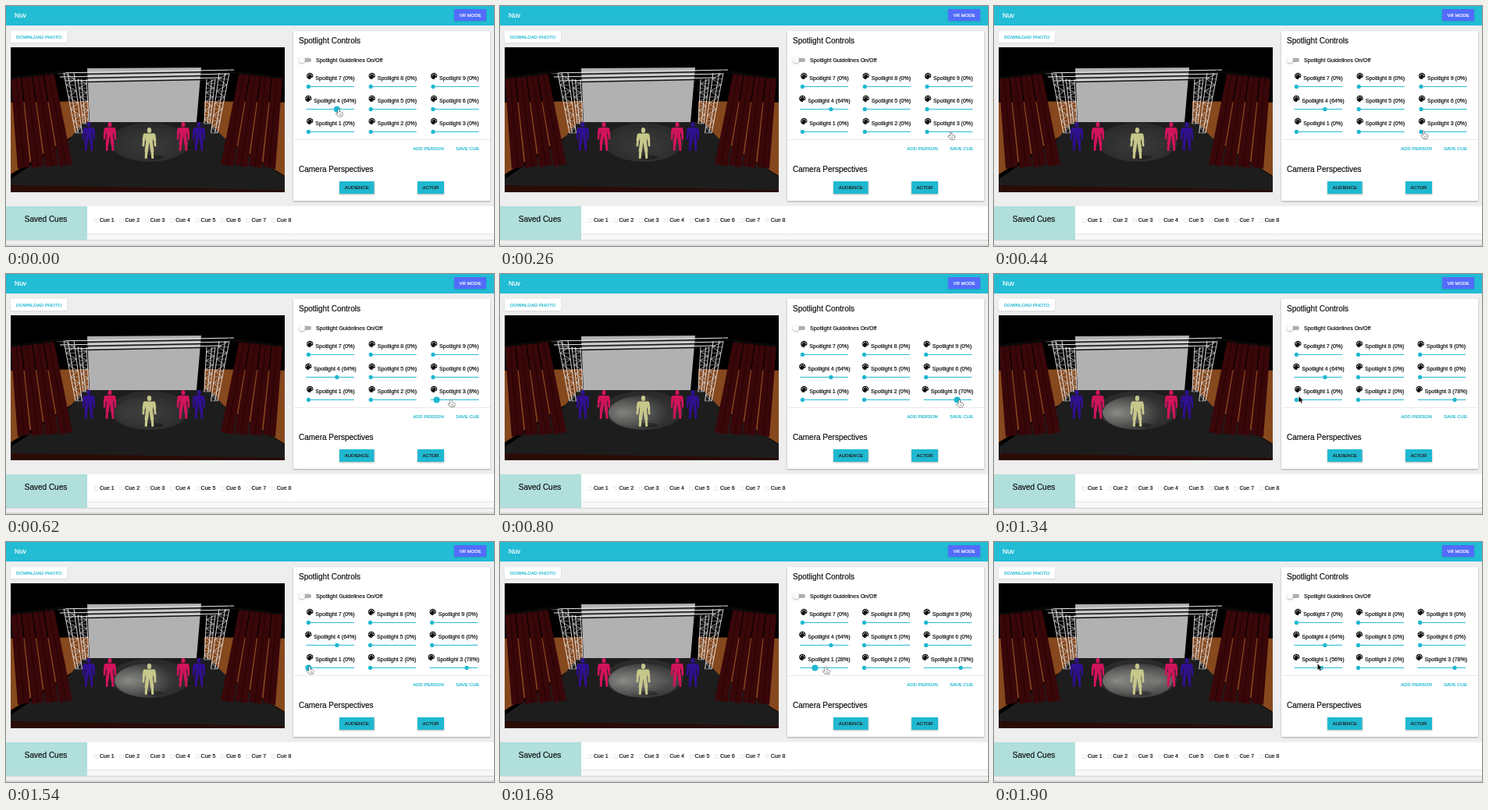
These frames come from a looping animation (625 px wide and 308 px high, 1920 ms). An HTML page with a canvas:

```html
<!DOCTYPE html>
<html lang="en">
<head>
<meta charset="utf-8">
<title>Stage lighting</title>
<style>
html, body { margin: 0; width: 100%; height: 100%; overflow: hidden; background: #eee; }
canvas { display: block; width: 625px; height: 308px; }
</style>
</head>
<body>
<canvas id="stage" width="625" height="308"></canvas>
<script>
const c = document.getElementById('stage').getContext('2d');
const LOOP = 1920, CYAN = '#1fb8d0', TAU = Math.PI * 2;
const FONT = '"Liberation Sans", Arial, sans-serif';

const mix = (a, b, k) => a + (b - a) * k;

// Decelerating progress from 0 to 1 between two times.
function ease(t, from, to) {
  const p = Math.min(1, Math.max(0, (t - from) / (to - from)));
  return 1 - (1 - p) ** 2;
}

function rect(x, y, w, h, fill) {
  c.fillStyle = fill;
  c.fillRect(x, y, w, h);
}

function poly(points, fill) {
  c.beginPath();
  for (let i = 0; i < points.length; i += 2) c.lineTo(points[i], points[i + 1]);
  c.closePath();
  c.fillStyle = fill;
  c.fill();
}

function line(x1, y1, x2, y2, color, width = 1) {
  c.beginPath();
  c.moveTo(x1, y1);
  c.lineTo(x2, y2);
  c.strokeStyle = color;
  c.lineWidth = width;
  c.stroke();
}

function oval(x, y, rx, ry, fill) {
  c.beginPath();
  c.ellipse(x, y, rx, ry, 0, 0, TAU);
  c.fillStyle = fill;
  c.fill();
}

// A hairline outline gives the type its slightly heavier weight.
function text(s, x, y, size, fill = '#111', align = 'left') {
  c.font = `${size}px ${FONT}`;
  c.textAlign = align;
  c.fillStyle = c.strokeStyle = fill;
  c.lineWidth = .2;
  c.fillText(s, x, y);
  c.strokeText(s, x, y);
}

function shadowed(draw, alpha = .3) {
  c.save();
  c.shadowColor = `rgba(0,0,0,${alpha})`;
  c.shadowBlur = 2;
  c.shadowOffsetY = 1;
  draw();
  c.restore();
}

function button(label, x, y, w, h, fill, color, shade) {
  shadowed(() => rect(x, y, w, h, fill), shade);
  text(label, x + w / 2, y + h / 2 + 2.2, 6, color, 'center');
}

// Pool of light on the floor, brightest toward one side.
function pool(side, power) {
  c.save();
  c.translate(184, 178);
  c.scale(45, 22);
  const g = c.createRadialGradient(side * .6, 0, 0, side * .6, 0, 1.3);
  g.addColorStop(0, `rgba(200,200,195,${power})`);
  g.addColorStop(.5, `rgba(180,180,175,${power * .55})`);
  g.addColorStop(1, 'rgba(160,160,160,0)');
  oval(0, 0, 1, 1, g);
  c.restore();
}

function person(x, top, height, fill) {
  c.save();
  c.translate(x, top);
  c.scale(height / 40, height / 40);
  c.lineCap = 'round';
  oval(0, 3.5, 2.7, 3.5, fill);
  poly([-6, 7.5, 6, 7.5, 4, 20, -4, 20], fill);
  for (const side of [-1, 1]) {
    line(side * 6, 9.5, side * 7, 16, fill, 3.8);
    line(side * 7, 16, side * 7.6, 23, fill, 2.8);
    line(side * 2.4, 20, side * 3.7, 30, fill, 4.4);
    line(side * 3.7, 30, side * 4.2, 38.5, fill, 3.2);
  }
  c.restore();
}

// Lattice tower that narrows and leans on its way down.
function tower(x, top, bottom, lean, width) {
  const at = (k, side) => [x + lean * k + side * width * (1 - k * .35), mix(top, bottom, k)];
  for (const side of [0, .4, 1]) line(...at(0, side), ...at(1, side), '#eee', .9);
  for (let i = 0; i < 10; i++) {
    const a = i / 10, b = a + .1, flip = i % 2;
    line(...at(a, flip), ...at(b, 1 - flip), '#ddd', .7);
    line(...at(b, 0), ...at(b, 1), '#bbb', .6);
  }
}

function mirrored(draw) {
  draw();
  c.save();
  c.translate(360, 0);
  c.scale(-1, 1);
  draw();
  c.restore();
}

function curtains() {
  for (let i = 0; i < 4; i++) {
    const top = 6 + i * 14, bottom = 15 + i * 18;
    poly([top, 92 - i * 2, top + 13, 90 - i * 2, bottom + 16, 206 - i, bottom, 209 - i], '#390709');
    line(top + 7, 92 - i * 2, bottom + 8, 207 - i, '#220304', 1);
  }
  line(-10, 94, 76, 84, '#080808', 3);
}

function scene(s1, s3) {
  c.save();
  c.beginPath();
  c.rect(6, 53, 351, 186);
  c.clip();
  rect(6, 53, 351, 186, '#000');
  mirrored(() => poly([-10, 124, 106, 122, 106, 150, 88, 165, -10, 226], '#86481d'));
  poly([100, 149, 260, 149, 284, 174, 357, 219, 357, 239, 6, 239, 6, 222, 80, 172], '#1d1d1d');
  poly([6, 230, 357, 236, 357, 239, 6, 239], '#2a0b06');

  poly([104, 80, 250, 79, 244, 149, 107, 149], '#b1b1b1');
  oval(184, 175, 51, 25, '#2b2b2b');
  pool(0, .1);
  pool(-1, s3 * .75);
  pool(1, s1 * .8);
  oval(190, 194, 12, 3, 'rgba(0,0,0,.3)');

  // Battens hung across the stage.
  for (let i = 0; i < 3; i++) {
    const y = 82 + i * 5;
    line(62 + i * 7, y + 4, 292 - i * 8, y, '#eee', 1);
    line(66 + i * 7, y + 6, 288 - i * 8, y + 2, '#161616', 1.4);
  }

  mirrored(() => {
    tower(74, 86, 163, 15, 13);
    tower(92, 94, 151, 7, 11);
    curtains();
  });

  for (const [x, fill] of [[106, '#2f108e'], [247, '#2f108e'], [133, '#d0145b'], [227, '#d0145b']]) {
    person(x, 149, 37, fill);
  }
  person(183.5, 156, 40, '#c6c78a');
  c.restore();
}

function palette(x, y) {
  oval(x, y, 4.2, 4.1, '#111');
  oval(x + 2.4, y + 3.2, 1.9, 1.4, '#fff');
  oval(x + 1.2, y + 1.9, 1, 1, '#111');
  for (let i = 0; i < 4; i++) {
    const a = Math.PI * (1.05 + i * .3);
    oval(x + Math.cos(a) * 2.6, y + Math.sin(a) * 2.4, .7, .7, '#fff');
  }
}

function spotlight(n, value, active, shift) {
  const col = (n - 1) % 3, row = 2 - Math.floor((n - 1) / 3);
  const mid = 416 + col * (79.4 - shift), zero = mid - 28.6 + col * .4;
  const y = 103.4 + row * 29;
  const label = `Spotlight ${n} (${value}%)`;
  c.font = `7.1px ${FONT}`;
  const left = mid - (c.measureText(label).width + 11) / 2;
  palette(left + 4, y - 13.6);
  text(label, left + 11, y - 8.3, 7.1);
  line(zero - (value ? 3 : 0), y, zero + 58.5, y, CYAN, 1);
  const r = active ? 4 : 2.6;
  oval(zero + value * .57, y, r, r, CYAN);
}

const HAND = new Path2D('M0 0Q1-1 1.7 0V3L5.2 4Q6 4.4 5.8 6L5 9H.4L-2.6 5.3Q-2.4 4 0 5.4Z');
const ARROW = new Path2D('M0 0V7.4L1.8 5.9 3 8.7 4.2 8.2 3 5.5H5.3Z');

function pointer(x, y, hand) {
  c.save();
  c.translate(x, y);
  const shape = hand ? HAND : ARROW;
  c.lineWidth = .9;
  c.fillStyle = hand ? '#fff' : '#000';
  c.strokeStyle = hand ? '#111' : '#fff';
  c.stroke(shape);
  c.fill(shape);
  if (hand) for (const dx of [1.8, 3.4]) line(dx, 5.6, dx, 7.6, '#333', .5);
  c.restore();
}

// Pointer moves: start, end, x, y.
const MOVES = [[0, 250, 576.5, 162], [300, 500, 547, 161], [500, 900, 590, 162],
  [960, 1320, 390.5, 157], [1400, 1560, 388, 160.5], [1560, 1720, 418, 160.5],
  [1820, 1900, 414.5, 156.5]];

function pointerAt(t) {
  let x = 424, y = 132.5;
  for (const [from, to, nextX, nextY] of MOVES) {
    const k = ease(t, from, to);
    x = mix(x, nextX, k);
    y = mix(y, nextY, k);
  }
  return [x, y];
}

function controls(t, s1, s3) {
  shadowed(() => rect(368, 32, 252, 218, '#fff'));
  text('Spotlight Controls', 375, 48, 10);
  c.beginPath();
  c.roundRect(377, 66.7, 14, 5.2, 2.6);
  c.fillStyle = '#b0b0b0';
  c.fill();
  shadowed(() => oval(379, 69.3, 4, 4, '#fafafa'));
  text('Spotlight Guidelines On/Off', 397, 72, 7.05);

  const active = { 4: t < 50, 3: t > 480 && t < 940, 1: t > 1480 && t < 1810 };
  const values = { 1: s1, 3: s3, 4: 64 };
  for (let n = 1; n <= 9; n++) spotlight(n, values[n] || 0, active[n], s3 > 9 ? .7 : 0);

  line(369, 171.5, 620, 171.5, '#e8e8e8');
  text('ADD PERSON', 541, 185, 6, CYAN, 'center');
  text('SAVE CUE', 591, 185, 6, CYAN, 'center');
  text('Camera Perspectives', 375, 213, 10);
  button('AUDIENCE', 427, 225, 44.5, 16, CYAN, '#222');
  button('ACTOR', 527, 225, 34, 16, CYAN, '#222');
}

function cues() {
  rect(0, 257, 625, 43, '#fff');
  rect(104, 292, 521, 8, '#f8f8f8');
  line(104, 292.5, 625, 292.5, '#e6e6e6');
  rect(0, 257, 104, 43, '#b0dfdc');
  line(0, 300.5, 625, 300.5, '#d0d0d0');
  text('Saved Cues', 51, 277, 10, '#111', 'center');
  for (let i = 0; i < 8; i++) {
    const x = 120 + i * 32.4;
    c.strokeStyle = '#ddd';
    c.lineWidth = .6;
    c.strokeRect(x - 6.5, 273, 4.5, 4.5);
    text('Cue ' + (i + 1), x, 277, 7);
  }
  rect(0, 306, 625, 2, '#dadada');
}

function draw(t) {
  const s3 = Math.round(78 * ease(t, 607, 890)), s1 = Math.round(56 * ease(t, 1650, 1757));
  rect(0, 0, 625, 308, '#eee');
  rect(0, 0, 625, 25, '#22bcd5');
  text('Nuv', 11, 14.7, 8.5, '#fff');
  button('VR MODE', 574, 4, 41, 15, '#526cfb', '#fff', .15);
  button('DOWNLOAD PHOTO', 6, 32, 72, 15, '#fff', CYAN, .1);
  scene(s1 / 100, s3 / 100);
  controls(t, s1, s3);
  cues();
  const arrow = (t > 940 && t < 1450) || t > 1840;
  pointer(...pointerAt(t), !arrow);
}

const start = performance.now();
function frame() {
  draw((performance.now() - start) % LOOP);
  requestAnimationFrame(frame);
}
frame();
</script>
</body>
</html>
```
